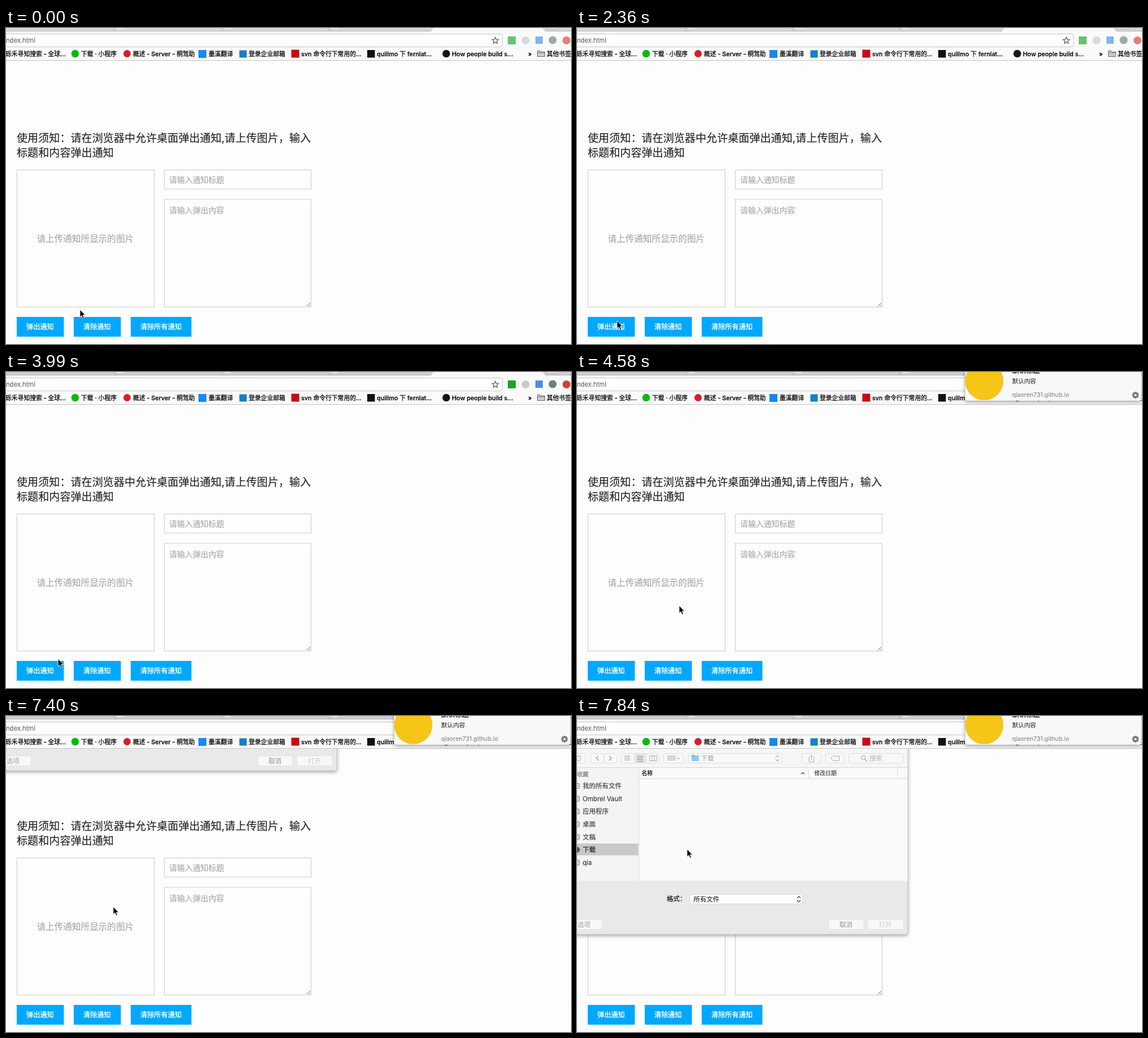
These frames come from a looping animation (1001x560 px, 7.99 s). An HTML page:

```html
<!DOCTYPE html>
<html lang="zh-CN">
<head>
<meta charset="utf-8">
<style>
html, body { margin: 0; width: 100%; height: 100%; overflow: hidden; background: #fdfdfd; }
svg { display: block; font-family: Inter, "Noto Sans CJK SC", "Noto Sans CJK", sans-serif; }
text { white-space: pre; }
.line { fill: none; }
.shade { filter: drop-shadow(0 2px 3px rgba(0, 0, 0, .35)); }
</style>
</head>
<body>
<svg id="stage" width="1001" height="560" viewBox="0 0 1001 560"></svg>
<script>
const LOOP = 7990, TICK = 148.1, FIRST = 427;

// A thin stroke gives the slightly heavy look of smoothed screen text
const text = (x, y, s, size, fill = '#222', weight = 400) =>
  `<text x="${x}" y="${y}" font-size="${size}" fill="${fill}" font-weight="${weight}"
    stroke="${fill}" stroke-width="${weight > 400 ? .3 : .12}">${s}</text>`;
const rect = (x, y, w, h, fill, more = '') =>
  `<rect x="${x}" y="${y}" width="${w}" height="${h}" fill="${fill}" ${more}/>`;
const disc = (x, y, r, fill) => `<circle cx="${x}" cy="${y}" r="${r}" fill="${fill}"/>`;
const line = (d, stroke = '#999', width = 1) =>
  `<path class="line" d="${d}" stroke="${stroke}" stroke-width="${width}"/>`;
const updown = (x, y, stroke) => line(`M${x - 3} ${y - 2}l3 -3l3 3M${x - 3} ${y + 2}l3 3l3 -3`, stroke, 1.2);

function page() {
  const box = (x, y, w, h) => rect(x, y, w, h, '#fdfdfd', 'stroke="#ccc"');
  const button = (x, w, s) => rect(x, 512, w, 35, '#00a8ff') + text(x + 17, 534.3, s, 12.2, '#fff', 500);
  return text(19, 202, '使用须知：请在浏览器中允许桌面弹出通知,请上传图片，输入', 19.1) +
    text(19, 228, '标题和内容弹出通知', 19.1) +
    box(19.5, 251.5, 243, 243) + text(54.5, 379.3, '请上传通知所显示的图片', 15.62, '#a6a6a6') +
    box(280.5, 251.5, 260, 34) + text(289, 274, '请输入通知标题', 13.92, '#a6a6a6') +
    box(280.5, 303.5, 260, 191) + text(289, 328, '请输入弹出内容', 13.92, '#a6a6a6') +
    line('M533 493l6 -6M536.5 493l2.5 -2.5', '#666') +
    button(19, 83.5, '弹出通知') + button(120, 83.5, '清除通知') + button(221, 107.5, '清除所有通知');
}

function browser() {
  const mark = (x, s) => text(x, 49.6, s, 10.8, '#111', 500);
  const star = Array.from({ length: 10 }, (_, i) => {
    const r = i % 2 ? 2.7 : 6, a = i * Math.PI / 5;
    return [867 + r * Math.sin(a), 22.3 - r * Math.cos(a)].map(v => v.toFixed(1));
  }).join(' ');
  return rect(0, 0, 1001, 57, '#fafafa') +
    rect(0, 0, 1001, 6, '#dadada', 'id="strip"') +
    line('M0 5.5H753l5 -5.5M951 0l4 5.5H1001', '#b0b0b0') +
    [193, 383, 573].map(x => line(`M${x - 3} 0l5 5.5`, '#aaa') + rect(x + 4, 0, 11, 1.5, '#f4f4f4')).join('') +
    '<path d="M757 0L752.5 6.5H955.5L951 0z" fill="#fafafa"/>' +
    rect(956.5, -8, 23, 10.5, '#e2e2e2', 'rx="3" stroke="#b4b4b4"') +
    rect(-10, 10.5, 889.5, 23, '#fff', 'rx="3" stroke="#c4c4c4"') +
    text(0, 26.3, 'ndex.html', 11.2, '#666') +
    `<polygon points="${star}" fill="none" stroke="#555" stroke-width="1.2"/>` +
    '<g id="tools">' + rect(889, 15, 14, 14, '#18a52c') + disc(920.5, 22, 7, '#c9c9c9') +
    rect(938, 15, 13, 13, '#448fe8') + disc(968.5, 21.5, 7, '#6c8078') + disc(993, 22, 7, '#d43f30') + '</g>' +
    mark(-1, '砾禾寻知搜索 - 全球...') +
    disc(122.5, 45.5, 6.8, '#09bb07') + mark(133, '下载 · 小程序') +
    disc(214.5, 45.5, 6.5, '#d8202a') + mark(225, '概述 - Server - 桐驾助') +
    rect(341, 39, 14, 14, '#1687f5') + mark(359, '墨溪翻译') +
    rect(413.5, 39.5, 13, 13, '#1480c8') + mark(430, '登录企业邮箱') +
    rect(505.5, 38.5, 14, 14, '#cc0812') + mark(523, 'svn 命令行下常用的...') +
    rect(640, 39, 13.5, 13.5, '#111') + mark(657, 'quillmo 下 fernlat...') +
    disc(780, 45.5, 6.8, '#161616') + mark(790, 'How people build s...') +
    mark(925, '»') +
    '<path d="M941.5 50.5v-10h5l1.5 2h6.5v8z" fill="#ccc" stroke="#666"/>' + line('M941.5 44h13', '#777') +
    mark(958, '其他书签') + rect(0, 57, 1001, 1, '#c4c4c4');
}

function dialog() {
  const frame = (x, w) => rect(x, 66.5, w, 17, '#f8f8f8', 'rx="3.5" stroke="#dedede"');
  const items = ['我的所有文件', 'Ombrel Vault', '应用程序', '桌面', '文稿', '下载', 'qia'];
  const button = (x, w, tx, s, fill) =>
    rect(x, 361, w, 17, '#f8f8f8', 'rx="3.5" stroke="#dfdfdf" stroke-width=".6"') + text(tx, 373.9, s, 11.5, fill);
  const dots = (x, y, cols) => Array.from({ length: cols * 2 }, (_, i) =>
    rect(x + i % cols * 5, y + (i / cols | 0) * 5, 3, 3, 'none', 'stroke="#aaa" stroke-width=".8"')).join('');
  return rect(-10, 40, 596, 347, '#e9e9e9', 'rx="4" class="shade" stroke="#c5c5c5"') +
    rect(0, 50, 585.5, 41, '#f6f6f6') + rect(0, 91, 109, 201, '#f4f4f4') + rect(109, 91, 476.5, 201, '#fafafa') +
    frame(-10, 25) + rect(0, 71, 6, 8, 'none', 'stroke="#aaa"') +
    frame(24.5, 22.5) + frame(48, 22) + line('M38 71l-4 4l4 4M57 71l4 4l-4 4', '#999', 1.2) +
    frame(78.5, 67) + rect(101, 67, 22.5, 16, '#e6e6e6') + dots(85, 70.5, 2) +
    line('M106.5 71.5h11m-11 3h11m-11 3h11m-11 3h11', '#888') +
    line('M128.5 70.5h13v9h-13zm4.3 0v9m4.4 0v-9', '#aaa') +
    frame(153.5, 35) + dots(161, 70.5, 3) + line('M176.5 73.5l3 3l3 -3', '#999') +
    frame(197.5, 166) + rect(203, 70, 13, 10, '#8ccdec', 'rx="1"') + rect(203, 69, 5, 3, '#70b9de') +
    text(219.5, 79.4, '下载', 11.5, '#aaa') + updown(355, 75, '#aaa') +
    frame(398.5, 33.5) + line('M412.5 73h-1.5v8h9v-8h-1.5M415.5 78v-9m-2.5 2.5l2.5 -2.5l2.5 2.5', '#aaa') +
    frame(440.5, 33.5) + line('M450 75l3.5 -4h11v8h-11z', '#aaa') +
    frame(481.5, 97) + line('M504 74a3.5 3.5 0 1 0 7 0a3.5 3.5 0 1 0 -7 0m6 3l4 4', '#aaa', 1.2) +
    text(518, 79.4, '搜索', 11.5, '#bbb') +
    line('M0 91.5H585.5M109 111H585.5M410.5 94v15M568 94v15M109.5 92V292', '#d6d6d6') +
    text(114.5, 104.7, '名称', 9.8, '#222', 500) + line('M397 103l3 -3l3 3', '#444', 1.2) +
    text(420.5, 104.7, '修改日期', 9.8, '#333') +
    text(0, 107.2, '收藏', 10.2, '#888', 500) +
    rect(0, 226, 108.5, 21, '#c9c9c9') +
    items.map((s, i) => {
      const y = 124 + i * 22.6, chosen = s === '下载';
      const icon = chosen ? disc(0, y, 5, '#555')
        : rect(-4, y - 4.5, 8, 9, '#ddd', 'rx="1.5" stroke="#777"');
      return icon + text(10, y + 4.2, s, 11.5, '#333', chosen ? 500 : 400);
    }).join('') +
    text(159, 328, '格式：', 11.5, '#222', 500) +
    rect(199.5, 316, 200.5, 17, '#fff', 'rx="3.5" stroke="#ccc" stroke-width=".8"') +
    text(206.5, 328.8, '所有文件', 11.4) + updown(393, 324.5, '#333') +
    button(-20, 64, 1, '选项', '#aaa') + button(446, 62, 465, '取消', '#999') + button(515, 63, 535, '打开', '#ccc');
}

function notice() {
  const teeth = Array.from({ length: 8 }, (_, i) =>
    rect(988, 35, 3, 3, '#777', `transform="rotate(${i * 45} 989.5 41)"`)).join('');
  return rect(687.5, -30, 312.5, 81, '#f8f8f8', 'rx="4" class="shade" stroke="#ccc" stroke-width=".6"') +
    disc(721.5, 16, 34, '#f5c518') +
    text(771, 2.4, '默认标题', 12.2, '#222', 500) + text(771, 19.8, '默认内容', 10.6, '#333') +
    text(771, 43.5, 'qiaoren731.github.io', 10.6, '#888') +
    teeth + '<circle cx="989.5" cy="41" r="3.3" fill="none" stroke="#777" stroke-width="2.4"/>';
}

const stage = document.getElementById('stage');
stage.innerHTML = `<defs><clipPath id="below"><rect y="58" width="1001" height="502"/></clipPath></defs>
${rect(0, 0, 1001, 560, '#fdfdfd')}${page()}
<g clip-path="url(#below)"><g id="dialog">${dialog()}</g></g>${browser()}
<g id="notice">${notice()}</g>
<g id="tip">${rect(157.5, 383.5, 81, 16.5, '#f1f1f1', 'class="shade" stroke="#ccc" stroke-width=".7"')}
${text(163.5, 395.3, '未选择任何文件', 9.75, '#111')}</g>
<g id="cursor"><path id="arrow" d="M0 -1V12.5l3 -2.8l2.2 5l2.3 -1l-2.2 -4.8H9.5z" fill="#000" stroke="#fff" stroke-width=".9"/>
<path id="hand" d="M-2 1q1.5 -2.5 3 0v4.5l5 1q2.5 1 2 4l-1.500 3.500h-6l-4.500 -5.500q-.5 -2.500 1.800 -1.500z" fill="#fff" stroke="#000"/></g>`;

const part = id => document.getElementById(id);
const [strip, tools, sheet, banner, tip, cursor, arrow, hand] =
  ['strip', 'tools', 'dialog', 'notice', 'tip', 'cursor', 'arrow', 'hand'].map(part);
const show = (el, on) => el.setAttribute('display', on ? 'inline' : 'none');
const move = (el, x, y) => el.setAttribute('transform', `translate(${x} ${y})`);

// Pointer path: tick, x, y
const path = [
  [-1, 131, 500], [1, 145, 523], [4, 196, 505], [7, 176, 462], [10, 130, 480], [13, 71, 520],
  [15, 70, 521], [20, 70, 521], [21, 70, 533], [23, 70, 533], [28, 181, 415], [29, 248, 404],
  [31, 248, 404], [36, 157, 367], [38, 157, 367], [43, 190, 339], [48, 190, 339], [50, 195, 237]
];
const drop = [290, 152, 45, 0];
const slide = [200, 80, 15, 0];

function pointer(k) {
  const i = Math.max(1, path.findIndex(p => p[0] >= k));
  const [a, b] = [path[i - 1], path[i]], u = (k - a[0]) / (b[0] - a[0]);
  return [a[1] + (b[1] - a[1]) * u, a[2] + (b[2] - a[2]) * u];
}

function draw(now) {
  const k = Math.min(50, Math.max(-1, Math.floor((now % LOOP - FIRST) / TICK)));
  const active = k >= 16, held = k >= 21 && k < 24;
  strip.setAttribute('fill', active ? '#cfcfcf' : '#dadada');
  tools.setAttribute('opacity', active ? 1 : .65);
  show(banner, k >= 25);
  move(banner, slide[Math.min(3, Math.max(0, k - 25))], 0);
  show(tip, k >= 37 && k < 39);
  show(sheet, k >= 47);
  move(sheet, 0, -drop[Math.max(0, k - 47)]);
  move(cursor, ...pointer(k));
  show(arrow, !held);
  show(hand, held);
  requestAnimationFrame(draw);
}
requestAnimationFrame(draw);
</script>
</body>
</html>
```
